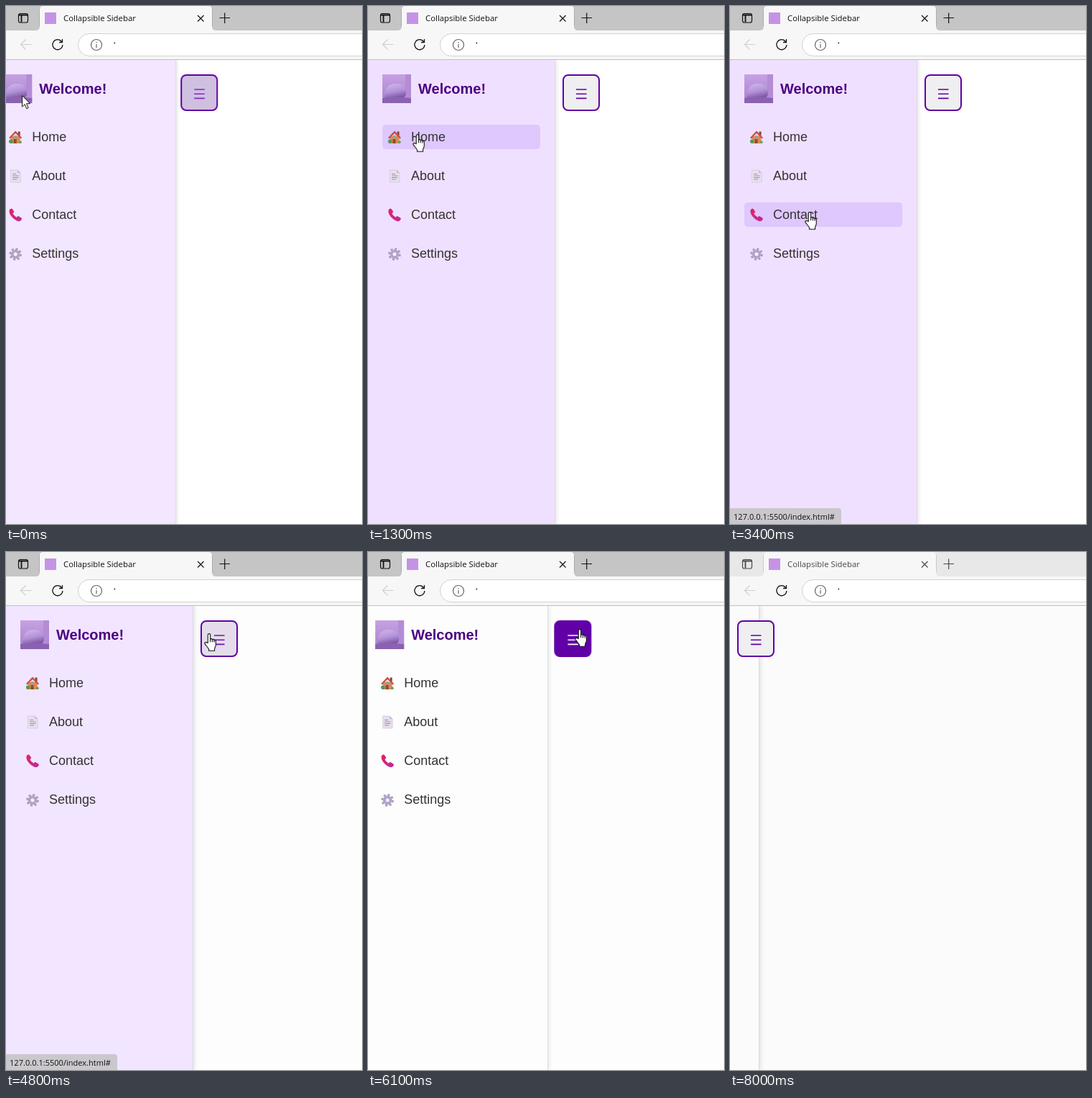
Write an HTML page that moves like this. It is 496x720 px and loops after 8.1 s.

```html
<!DOCTYPE html>
<html lang="en">
<head>
<meta charset="utf-8">
<title>Collapsible Sidebar</title>
<style>
html, body { margin: 0; width: 100%; height: 100%; overflow: hidden; background: #fff; }
.stage {
  position: relative; width: 496px; height: 720px; overflow: hidden;
  font-family: "Liberation Sans", Arial, sans-serif;
}
.stage, .stage * { box-sizing: border-box; }
.stage svg { position: absolute; display: block; overflow: visible; }
.anim { animation: 8.1s linear infinite; }
.ui { font-family: "Open Sans", "Noto Sans", sans-serif; }

.stage { animation-name: page; }
.sidebar {
  position: absolute; left: 0; top: 75px; width: 261px; height: 645px;
  border-right: 1px solid #dcdadf; box-shadow: 2px 0 5px rgba(0, 0, 0, .1);
  animation-name: slide, tint; animation-duration: 8.1s;
}
.avatar { left: 20px; top: 20px; }
h1 {
  position: absolute; left: 70px; top: 28px; margin: 0;
  font-size: 20px; line-height: 24px; color: #4b0082; white-space: nowrap;
}
.link {
  position: absolute; left: 20px; width: 220px; height: 34px; border-radius: 5px;
  padding-left: 40px; font-size: 18px; line-height: 34px; color: #333;
}
.link svg { left: 7px; top: 7px; }
.home { top: 90px; animation-name: home; }
.about { top: 144px; animation-name: about; }
.contact { top: 198px; animation-name: contact; }
.settings { top: 252px; animation-name: settings; }

.toggle {
  position: absolute; left: 271px; top: 95px; width: 52px; height: 51px;
  border: 2px solid #6000a4; border-radius: 8px;
  animation-name: shift, press; animation-duration: 8.1s;
}
.toggle svg { left: 17px; top: 18px; }
.chrome { left: 0; top: 0; }
.strip { animation-name: strip; }
.ink { animation-name: ink; color: #111; }
.status {
  position: absolute; left: 0; top: 698px; width: 155px; height: 22px; padding-left: 5px;
  background: #cac8cc; border-top-right-radius: 4px; color: #111;
  font-size: 11.05px; line-height: 23px; white-space: nowrap;
  animation-name: status; animation-timing-function: step-end;
}
.cursor { position: absolute; left: 0; top: 0; animation-name: path; }
.hand { left: -7px; top: -1px; animation-name: hand; animation-timing-function: step-end; }
.arrow { left: 0; top: 0; animation-name: arrow; animation-timing-function: step-end; }

@keyframes page {
  0%, 55% { background: #fff; }
  59%, 75% { background: #fdfdfd; }
  81%, 100% { background: #fbfbfb; }
}
@keyframes slide {
  0% { transform: translateX(-24px); }
  1.235% { transform: translateX(-5px); }
  2.47% { transform: none; }
  74.94% { transform: none; animation-timing-function: ease; }
  81.11%, 100% { transform: translateX(-220px); }
}
@keyframes tint {
  0% { background: #f3e6ff; }
  3%, 58.4% { background: #f0e0ff; animation-timing-function: ease; }
  64.57%, 75% { background: #fdfdfd; }
  81%, 100% { background: #fbfbfb; }
}
@keyframes shift {
  0% { transform: translateX(-28px); }
  1.235% { transform: translateX(-6px); }
  2.47% { transform: none; }
  74.94% { transform: none; animation-timing-function: ease; }
  81.11%, 100% { transform: translateX(-261px); }
}
@keyframes press {
  0% { background: #d0c0e0; color: #8426c0; }
  3.1%, 58.95% { background: #efeef0; color: #6000a4; animation-timing-function: ease; }
  62.65%, 75.93% { background: #6200a8; color: #fff; animation-timing-function: ease; }
  79.63%, 100% { background: #efeef0; color: #6000a4; }
}
@keyframes home {
  0%, 8.64% { background: #dec8fe00; }
  12.35%, 26.54% { background: #dec8fe; }
  30.25%, 100% { background: #dec8fe00; }
}
@keyframes about {
  0%, 29.01% { background: #dec8fe00; }
  32.72%, 36.05% { background: #dec8fe; }
  39.75%, 100% { background: #dec8fe00; }
}
@keyframes contact {
  0%, 38.02% { background: #dec8fe00; }
  41.6%, 45.93% { background: #dec8fe; }
  49.63%, 100% { background: #dec8fe00; }
}
@keyframes settings {
  0%, 47.53% { background: #dec8fe00; }
  51.24%, 51.85% { background: #dec8fe; }
  55.56%, 100% { background: #dec8fe00; }
}
@keyframes strip {
  0%, 95.7% { fill: #c5c5c5; }
  98.1%, 100% { fill: #e8e8e8; }
}
@keyframes ink {
  0%, 95.7% { color: #111; }
  98.1%, 100% { color: #484848; }
}
@keyframes status {
  0% { opacity: 0; }
  18.52% { opacity: 1; }
  61.73%, 100% { opacity: 0; }
}
@keyframes path {
  0% { transform: translate(22px, 124px); }
  3.7% { transform: translate(26px, 132px); }
  8.64% { transform: translate(55px, 166px); }
  12.35% { transform: translate(66px, 176px); }
  16.05% { transform: translate(69px, 179px); }
  24.69% { transform: translate(71px, 185px); }
  28.4% { transform: translate(78px, 215px); }
  32.1% { transform: translate(90px, 240px); }
  35.8% { transform: translate(98px, 252px); }
  39.51% { transform: translate(110px, 284px); }
  41.98% { transform: translate(111px, 287px); }
  45.68% { transform: translate(112px, 306px); }
  48.15% { transform: translate(118px, 342px); }
  50.62% { transform: translate(124px, 345px); }
  53.09% { transform: translate(180px, 270px); }
  55.56% { transform: translate(240px, 170px); }
  57.41% { transform: translate(268px, 128px); }
  59.26% { transform: translate(283px, 114px); }
  64.2% { transform: translate(290px, 110px); }
  74.07%, 77.78% { transform: translate(295px, 108px); }
  82.72% { transform: translate(320px, 102px); }
  88.89% { transform: translate(323px, 83px); }
  92.59% { transform: translate(400px, 20px); }
  93.83%, 100% { transform: translate(430px, -30px); }
}
@keyframes hand {
  0%, 26.54%, 36.05%, 45.93%, 51.85%, 75.93%, 100% { opacity: 0; }
  8.64%, 29.01%, 38.02%, 47.53%, 58.89% { opacity: 1; }
}
@keyframes arrow {
  0%, 26.54%, 36.05%, 45.93%, 51.85%, 75.93%, 100% { opacity: 1; }
  8.64%, 29.01%, 38.02%, 47.53%, 58.89% { opacity: 0; }
}
</style>
</head>
<body>
<div class="stage anim">
  <div class="sidebar anim">
    <svg class="avatar" width="40" height="40">
      <defs>
        <linearGradient id="wall" x2="0" y2="1">
          <stop stop-color="#c6a2e2"/><stop offset="1" stop-color="#a87fcb"/>
        </linearGradient>
        <linearGradient id="blob" x2=".3" y2="1">
          <stop stop-color="#d3b9ee"/><stop offset=".6" stop-color="#b291d8"/><stop offset="1" stop-color="#7f57a6"/>
        </linearGradient>
      </defs>
      <rect width="40" height="40" fill="url(#wall)"/>
      <rect x="32" width="8" height="40" fill="#b48cd6"/>
      <path d="M3 33C2 20 9 12 20 13c9 0 13 6 13 13 0 5-4 8-11 8z" fill="url(#blob)"/>
      <path d="M0 33q16-3 40 0v7H0z" fill="#8b62b2"/>
    </svg>
    <h1>Welcome!</h1>

    <div class="link home anim">
      <svg width="20" height="20">
        <path d="M3.5 9h13v10h-13z" fill="#d98c58"/>
        <path d="M13.5 2.5h3v6h-3z" fill="#8c4038"/>
        <path d="M1 11 10 1.5 19 11l-1.6 1.4L10 5l-7.400 7.400z" fill="#c9503f"/>
        <path d="M7.500 13h4v6h-4z" fill="#8a4b3c"/>
        <path d="M8 8h4v3H8z" fill="#7fa6c4"/>
        <circle cx="3.600" cy="16.300" r="2.700" fill="#4f9a58"/>
        <circle cx="16.800" cy="17.200" r="1.900" fill="#5ba55c"/>
      </svg>Home
    </div>
    <div class="link about anim">
      <svg width="20" height="20">
        <path d="M3.500 2h9.500l4 4v13H3.500z" fill="#e7e0ee" stroke="#cdc3d8" stroke-width=".7"/>
        <path d="M13 2v4h4z" fill="#c3b8d0"/>
        <path d="M6 7.500h5M6 10h8.500M6 12.500h8.500M6 15h6" stroke="#9c93a8"/>
      </svg>About
    </div>
    <div class="link contact anim">
      <svg width="20" height="20">
        <defs>
          <linearGradient id="call" x2="1" y2="1">
            <stop stop-color="#e2245f"/><stop offset="1" stop-color="#bb2c9c"/>
          </linearGradient>
        </defs>
        <path d="M1.500 3.500Q4 .5 5.500 2L8 5.500Q8.500 7 6.300 8.300q1.500 3.500 5.300 5.500Q13 11.500 14.500 12.200l4 2.600q1.300 1.200-1.700 4-3 1.500-8.600-2.600Q.4 10 1.500 3.500z" fill="url(#call)"/>
      </svg>Contact
    </div>
    <div class="link settings anim">
      <svg width="20" height="20">
        <circle cx="10" cy="11" r="7.400" fill="none" stroke="#a99abf" stroke-width="2.800" stroke-dasharray="3 2.811"/>
        <circle cx="10" cy="11" r="4.800" fill="#f3eefa" stroke="#b3a6c8" stroke-width="3.200"/>
        <circle cx="10" cy="11" r="3.200" fill="none" stroke="#8f80a8" stroke-width=".7"/>
      </svg>Settings
    </div>
  </div>

  <div class="toggle anim">
    <svg width="15" height="15" fill="none" stroke="currentColor" stroke-width="1.600">
      <path d="M0 1h14.500M0 7.200h14.500M0 13.400h14.500"/>
    </svg>
  </div>

  <svg class="chrome" width="496" height="75">
    <rect class="strip anim" width="496" height="34" fill="#c5c5c5"/>
    <rect y="34" width="496" height="40" fill="#f7f7f7"/>
    <path d="M41 34q6 0 6-6V5q0-5 5-5h230q5 0 5 5v23q0 6 6 6z" fill="#f7f7f7"/>
    <path d="M46.500 28V4M287.500 28V4" stroke="#000" stroke-opacity=".12"/>
    <rect y="74" width="496" height="1" fill="#bfbfbf"/>
    <rect x="100.500" y="38.500" width="430" height="31" rx="15.500" fill="#fff" stroke="#d2d2d2"/>
    <rect x="54" y="9" width="16" height="16" fill="#c593e6"/>
    <path d="M35.500 53.500H20.500m7-7-7 7 7 7" fill="none" stroke="#cfcfcf" stroke-width="1.200"/>
    <g class="ink anim" fill="none" stroke="currentColor" stroke-width="1.200">
      <rect x="17.500" y="10.500" width="13" height="12.500" rx="2.500"/>
      <path d="M18 12.500h12M21.500 13v9.500" stroke-width="1.800"/>
      <path d="m267 13 8.500 8.500m0-8.500-8.500 8.500M297.500 16.500h14.500M304.700 9.500v14.500"/>
      <text class="ui" x="80" y="21" font-size="11.370" fill="currentColor" stroke="none">Collapsible Sidebar</text>
    </g>
    <path d="M77.500 49.500a7 7 0 1 0 1.400 4.500M78.500 46v4.500H74" fill="none" stroke="#151515" stroke-width="1.300"/>
    <g fill="none" stroke="#666" stroke-width="1.200">
      <circle cx="126" cy="54" r="7.500"/>
      <path d="M126 53v5M126 50v1.500"/>
    </g>
    <circle cx="151.300" cy="51.500" r=".9" fill="#222"/>
  </svg>

  <div class="status ui anim">127.0.0.1:5500/index.html#</div>

  <div class="cursor anim">
    <svg class="arrow anim" width="13" height="20" fill="#fff" stroke="#111">
      <path d="M.5.500V16l3.600-3.400 2.600 6 2.400-1-2.600-6h5z"/>
    </svg>
    <svg class="hand anim" width="18" height="26" fill="#fff" stroke="#111" stroke-width="1.100">
      <path d="M5.200 13.500V2.300a1.700 1.700 0 0 1 3.400 0V8.200c.6-.9 2.600-.7 2.800.5.7-.7 2.400-.4 2.600.8.8-.4 2.300 0 2.300 1.500v5c0 2.800-1.800 4-1.800 6v2.300H6.600V22.500C6 20.500 3 17.500 1 14.600c-1-1.500 1-3 2.400-1.800z"/>
      <path d="M8.600 8.200v4M11.400 8.700v3.500M14 9.500v3"/>
    </svg>
  </div>
</div>
</body>
</html>
```
